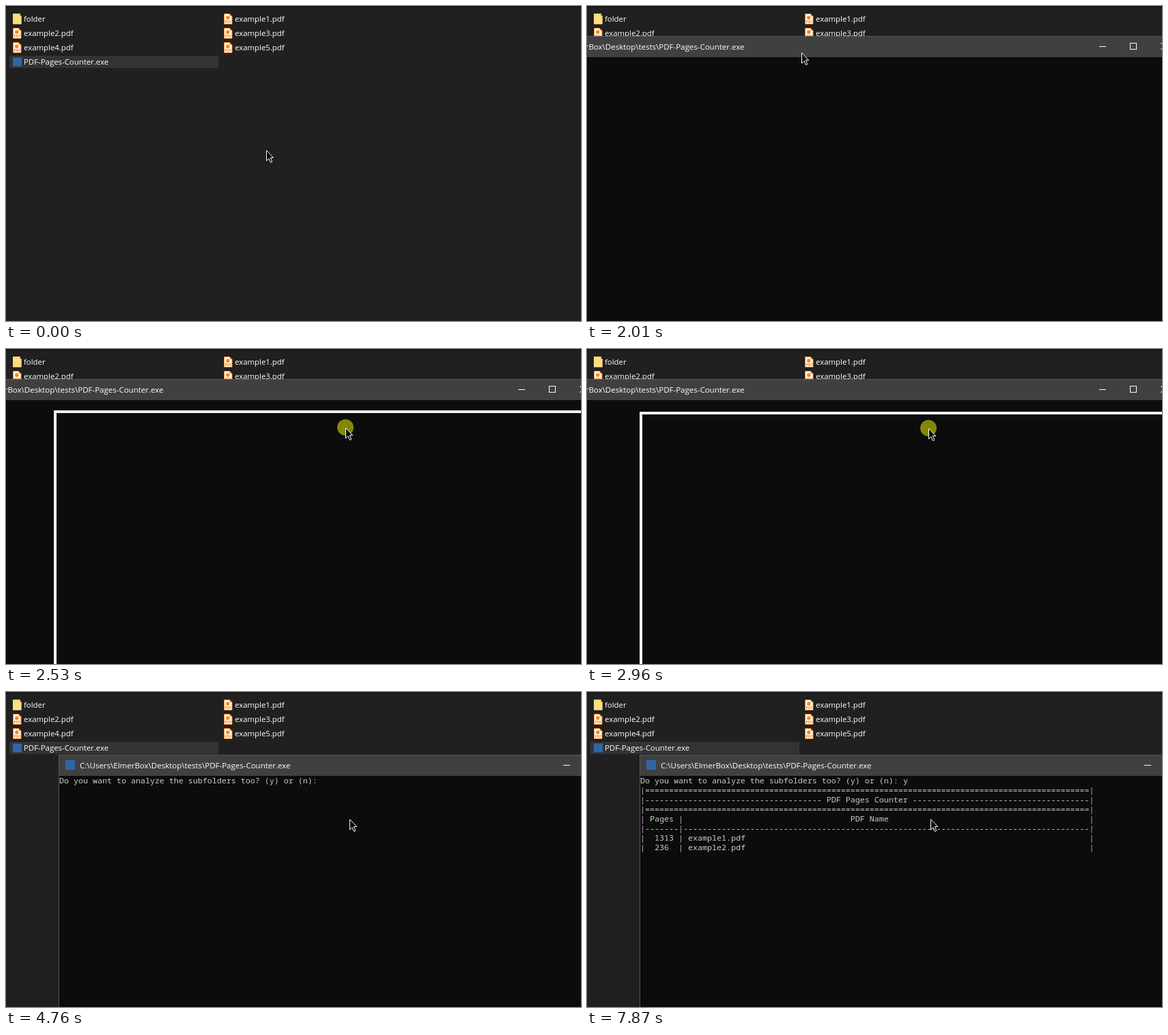
Recreate the animation shown at these times as an HTML page. Size 842 by 462 pixels, loop 8000 ms.

```html
<!DOCTYPE html>
<html lang="en">
<head>
<meta charset="utf-8">
<title>PDF Pages Counter</title>
<style>
  html, body { margin: 0; width: 100%; height: 100%; overflow: hidden; background: #202020; }
  #stage {
    position: relative; width: 842px; height: 462px; overflow: hidden; background: #202020;
    color: #fff; font: 11.4px/20px "Open Sans", "Noto Sans", sans-serif;
  }
  :where(#stage div, #stage svg) { position: absolute; left: 0; top: 0; }
  .strip { width: 842px; height: 3px; background: #191919; }

  /* Explorer */
  .file { height: 20px; }
  .file svg { top: 2px; width: 13px; height: 16px; }
  .file span { position: absolute; left: 16px; white-space: nowrap; }
  .row { left: 5px; top: 73px; width: 306px; height: 18px; background: #333; }
  .hover { left: 4px; top: 72px; width: 306px; height: 18px; background: #777; border: 1px solid #636363; }
  .mark { background: #2f66a8; }

  /* Console window */
  .win { left: -109px; top: 44px; width: 977px; height: 560px; background: #0c0c0c; box-shadow: inset 1px 0 #555; }
  .bar { width: 100%; height: 31px; background: #404040; box-shadow: inset 0 1px #575757, inset 1px 0 #575757; }
  .bar .mark { left: 10px; top: 8px; width: 14px; height: 14px; }
  .title { left: 31px; top: 6px; font-size: 11.5px; white-space: nowrap; }
  .min { top: 15px; width: 10px; height: 1px; background: #fff; }
  .max { left: 904px; top: 10px; width: 8px; height: 8px; border: 1px solid #fff; }
  .close { left: 949px; top: 10px; width: 10px; height: 10px; stroke: #fff; }
  .out { left: 1px; color: #ccc; font: 11.667px/14px "Noto Sans Mono", "DejaVu Sans Mono", monospace; white-space: pre; }
  .out i { font-style: normal; color: #d3a3d8; }
  .caret { left: 1px; top: 41px; width: 7px; height: 4px; background: #ccc; }

  .outline { width: 1200px; height: 600px; border: solid #f2f2f2; border-width: 4px 0 0 4px; }
  .pointer { left: 381px; top: 211px; }
  .pointer svg { width: 12px; height: 20px; }
  .press { left: -12px; top: -12px; width: 24px; height: 24px; border-radius: 50%; background: rgba(255, 255, 0, .5); }

  /* Timing: 1% is 80 ms */
  .hover, .win, .ask, .key, .table, .first, .second, .caret, .outline, .pointer, .press, .late {
    animation: 8s step-end infinite;
  }
  .hover { animation-name: hover; }
  .win { animation-name: win; }
  .ask, .late { animation-name: ask; }
  .key { animation-name: key; }
  .table { animation-name: table; }
  .first { animation-name: first; }
  .second { animation-name: second; }
  .caret { animation-name: caret; }
  .press { animation-name: press; }
  .outline { animation-name: drag, outline; animation-timing-function: linear, step-end; }
  .pointer { animation-name: pointer; animation-timing-function: linear; }

  @keyframes hover { 0% { opacity: 0 } 6.9% { opacity: 1 } 16.35%, 100% { opacity: 0 } }
  @keyframes win {
    0% { opacity: 0; left: -109px; top: 44px }
    16.35% { opacity: 1 }
    38.35%, 100% { opacity: 1; left: 77px; top: 92px }
  }
  @keyframes ask { 0% { opacity: 0 } 49.1%, 100% { opacity: 1 } }
  @keyframes key { 0% { opacity: 0 } 69.1%, 100% { opacity: 1 } }
  @keyframes table { 0% { opacity: 0 } 81.85%, 100% { opacity: 1 } }
  @keyframes first { 0% { opacity: 0 } 92.7%, 100% { opacity: 1 } }
  @keyframes second { 0% { opacity: 0 } 98.3%, 100% { opacity: 1 } }
  @keyframes caret {
    0% { opacity: 0; left: 1px; top: 41px }
    38.35% { opacity: 1 }
    44.5% { opacity: 0 }
    50% { opacity: 1; left: 386px }
    59.45% { opacity: 0 }
    65.45% { opacity: 1 }
    69.1% { opacity: 1; left: 393px }
    72.1% { opacity: 0 }
    78.6% { opacity: 1 }
    82.1% { opacity: 1; left: 1px; top: 125px }
    91.35%, 100% { opacity: 0; left: 1px; top: 125px }
  }
  @keyframes press {
    0% { opacity: 0 }
    10.35% { opacity: 1 } 11.5% { opacity: 0 }
    12.6% { opacity: 1 } 13.7% { opacity: 0 }
    26.1% { opacity: 1 } 38.35%, 100% { opacity: 0 }
  }
  @keyframes outline { 0% { opacity: 0 } 26.6% { opacity: 1 } 38.35%, 100% { opacity: 0 } }
  @keyframes drag {
    0%, 26.6% { left: -109px; top: 44px }
    29.875% { left: 10px; top: 75px }
    31.125% { left: 66px; top: 89px }
    33.625%, 35.375% { left: 87px; top: 93px }
    36.95%, 100% { left: 77px; top: 92px }
  }
  @keyframes pointer {
    0% { left: 381px; top: 211px }
    .375% { left: 381px; top: 211px; animation-timing-function: ease-in-out }
    4.625%, 6.7% { left: 286px; top: 92px }
    7.875% { left: 283px; top: 82px }
    21.25% { left: 283px; top: 82px; animation-timing-function: ease-in-out }
    25.1%, 26.375% { left: 314px; top: 68px }
    29.875% { left: 443px; top: 103px }
    31.125% { left: 491px; top: 114px; animation-timing-function: ease-out }
    33.625%, 35.375% { left: 510px; top: 117px }
    36.95% { left: 500px; top: 116px }
    42.4% { left: 500px; top: 116px; animation-timing-function: ease-in-out }
    46.5%, 49% { left: 503px; top: 183px }
    50%, 100% { left: 503px; top: 186px }
  }
</style>
</head>
<body>
<svg width="0" height="0" style="position:absolute">
  <symbol id="folder" viewBox="0 0 13 16">
    <path d="M0 0H11V3H12.5V15.5H0Z" fill="#f3c75b"/>
    <path d="M0 1H9.5V4H12.5V15.5H0Z" fill="#ffdc83"/>
  </symbol>
  <symbol id="pdf" viewBox="0 0 13 16">
    <path d="M.5 .5H8.5L12 4V15.5H.5Z" fill="#fff" stroke="#e8811a"/>
    <path d="M8.5 .5V4H12Z" fill="#e8811a"/>
    <circle cx="5.8" cy="6.2" r="2.7" fill="#f08a1c"/>
    <text x="6.3" y="14" text-anchor="middle" font-family="Open Sans, sans-serif" font-size="5" font-weight="700" fill="#e8811a">PDF</text>
  </symbol>
  <symbol id="exe" viewBox="0 0 13 16"><rect y="1.5" width="13" height="13" fill="#2f66a8"/></symbol>
</svg>

<div id="stage">
  <div class="strip"></div>
  <div class="row"></div>
  <div class="hover"></div>
  <div id="files"></div>

  <div class="win">
    <div class="bar">
      <div class="mark"></div>
      <div class="title">C:\Users\ElmerBox\Desktop\tests\PDF-Pages-Counter.exe</div>
      <div class="min" style="left:859px"></div>
      <div class="max"></div>
      <svg class="close" viewBox="0 0 10 10"><path d="M0 0L10 10M10 0L0 10"/></svg>
      <div class="min late" style="left:739px"></div>
    </div>
    <div class="out ask" style="top:31px">Do you want to analyze the subfolders too? (y) or (n):</div>
    <div class="out key" style="top:31px;left:386px">y</div>
    <div class="out table" style="top:45px"></div>
    <div class="out first" style="top:115px"></div>
    <div class="out second" style="top:129px"></div>
    <div class="caret"></div>
  </div>

  <div class="outline"></div>
  <div class="pointer">
    <div class="press"></div>
    <svg viewBox="0 0 12 20"><path d="M.5 .8V16L4 12.7L6.5 18.5L8.7 17.5L6.3 11.5H10.6Z" fill="#000" stroke="#fff"/></svg>
  </div>
</div>

<script>
  const find = s => document.querySelector(s);

  // Files fill two columns, row by row
  const files = ['folder', 'example1.pdf', 'example2.pdf', 'example3.pdf',
    'example4.pdf', 'example5.pdf', 'PDF-Pages-Counter.exe'];
  find('#files').innerHTML = files.map((name, i) => {
    const x = i % 2 ? 319 : 10, y = 9 + 21 * (i >> 1);
    return `<div class="file" style="left:${x}px;top:${y}px">` +
      `<svg><use href="#${name.split('.').pop()}"/></svg><span>${name}</span></div>`;
  }).join('');

  // Table of 95 columns
  const line = (...cells) => ['', ...cells, ''].join('<i>|</i>');
  const entry = (pages, name) => line(`  ${pages}`.padEnd(7), ` ${name}`.padEnd(85));
  const rule = line('='.repeat(93));
  const side = '-'.repeat(37);
  find('.table').innerHTML = [
    rule,
    line(`${side} PDF Pages Counter ${side}`),
    rule,
    line(' Pages ', (' '.repeat(35) + 'PDF Name').padEnd(85)),
    line('-'.repeat(7), '-'.repeat(85))
  ].join('\n');
  find('.first').innerHTML = entry(1313, 'example1.pdf');
  find('.second').innerHTML = entry(236, 'example2.pdf');
</script>
</body>
</html>
```
